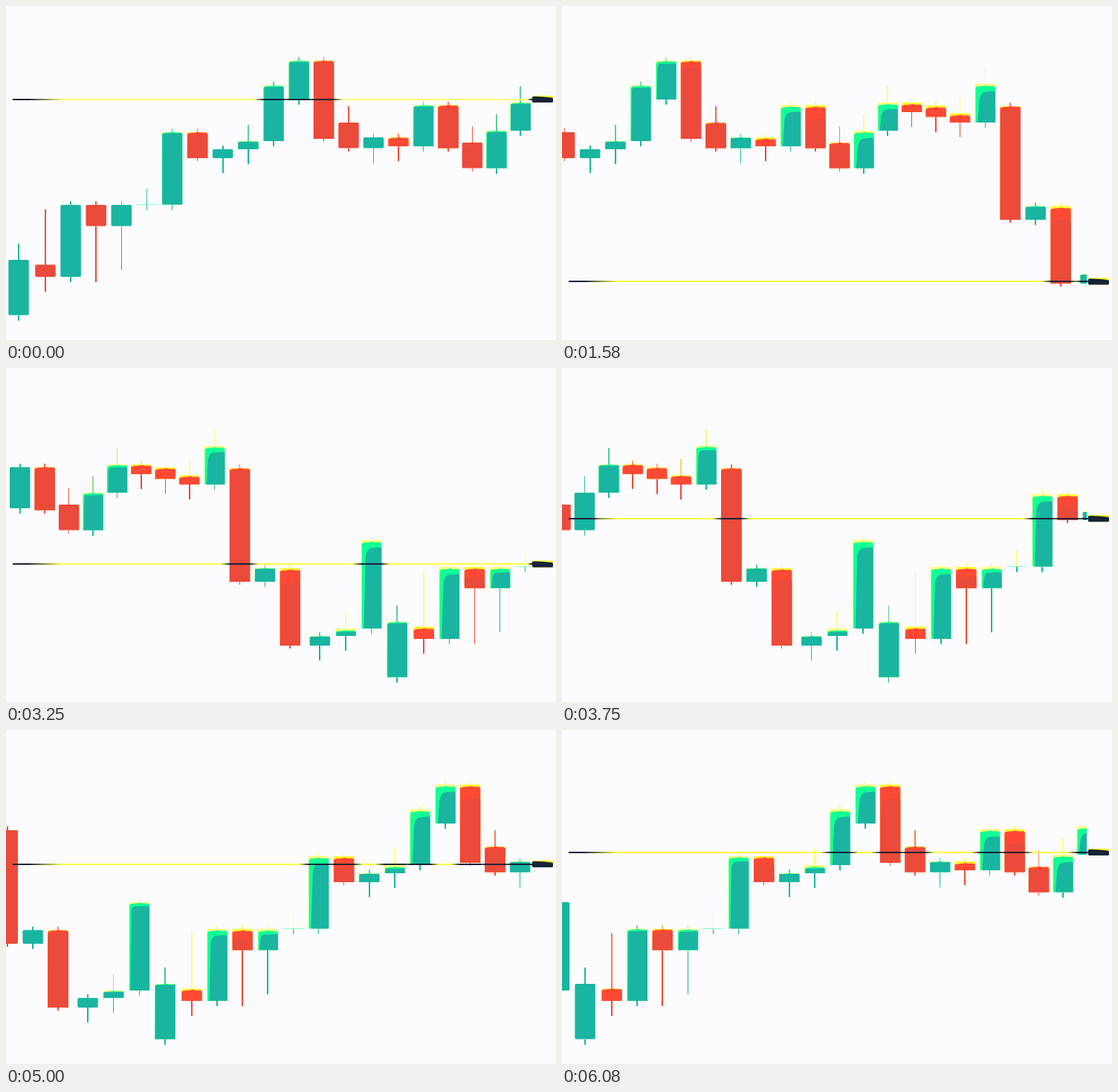
A matplotlib script that plays this animation: 740x450 px, repeating every 6160 ms.

```python
import numpy as np
import matplotlib.pyplot as plt
from matplotlib.animation import FuncAnimation
from matplotlib.collections import PolyCollection
from matplotlib.colors import to_rgb
from matplotlib.patches import Polygon, Rectangle

W, H = 740, 450
TICK_MS, LOOP_MS, RATE = 20, 6160, 12   # picture steps 12 times a second
PERIOD = 1052          # width of the repeating series
EDGE = 706             # candles are cut off here
HALF = 13.75           # half a body width

PAPER, NAVY, YELLOW = "#fcfcfe", "#172338", "#ffff2e"
TEAL, MINT = "#19b5a1", "#12ff96"
RED, SCARLET = "#ec4a3a", "#ff4934"

# Each candle opens at the last close unless it reopens at a gap.
CLOSES = [342, 365, 268, 296.5, 268, 267.5, 170, 205, 193, 182, 107, 73.5,
          179, 191.5, 177, 189, 133.5, 191.5, 218.5, 168, 130, 143, 149.5,
          157, 105, 288, 269.5, 374, 361, 351, 232]
REOPEN = {0: 416.5, 1: 348.5, 11: 126, 13: 157, 18: 184, 22: 134, 23: 144.5,
          25: 135}
LONG_TOP = {0, 5, 9, 13, 18, 19, 20, 23, 24, 29}
SPIKE_UP, SPIKE_DOWN = {1: 75}, {3: 75, 4: 59}

XS = np.interp(range(len(CLOSES)), [0, 1, 11, 17, 23, 27, 28, 31],
               [17, 53, 394, 595, 789.5, 925, 965, 1069])


def make_candles():
    """Open, close, high, low and glow strength of every candle."""
    out, prev_top = [], 232
    for i, close in enumerate(CLOSES):
        start = REOPEN.get(i, CLOSES[i - 1])
        top, bot = min(start, close), max(start, close)
        above = SPIKE_UP.get(i, 22 if i in LONG_TOP else 5)
        usual = 20 if 4 < bot - top < 17 else 7 if close < start else 4
        below = SPIKE_DOWN.get(i, usual)
        # a candle well below its neighbour hardly glows
        strength = 0.2 if top > prev_top + 15 else 1
        out.append((start, close, top - above, bot + below, strength))
        prev_top = top
    return out


CANDLES = make_candles()


def scroll_at(step):
    return np.interp(step, [0, 19, 51, 60, 74], [0, 254, 716, 855, PERIOD])


def price_path():
    """Price against scroll: open to close per candle, plus a few ticks."""
    ticks = [(0, 125.5), (254, 371), (427, 331.5), (543, 264), (716, 128.5),
             (855, 180.5), (1038, 164.5), (PERIOD, 125.5)]
    knots = list(ticks)
    for x, (start, close, *_) in zip(XS, CANDLES):
        for s, y in (((x - 720) % PERIOD, start), ((x - 690) % PERIOD, close)):
            if all(abs(s - t) > 4 for t, _ in ticks):
                knots.append((s, y))
    return np.array(sorted(knots)).T


PATH_S, PATH_Y = price_path()


def mix(a, b, t):
    return tuple(np.array(to_rgb(a)) * (1 - t) + np.array(to_rgb(b)) * t)


PALE = mix(YELLOW, PAPER, 0.35)


def box(x0, y0, x1, y1):
    return [(x0, y0), (x1, y0), (x1, y1), (x0, y1)]


def rounded(x0, y0, x1, y1):
    c = min(1.2, (y1 - y0) / 3)
    return [(x0 + c, y0), (x1 - c, y0), (x1, y0 + c), (x1, y1 - c),
            (x1 - c, y1), (x0 + c, y1), (x0, y1 - c), (x0, y0 + c)]


def curved(x0, x1, top, bot, rim, drop):
    """Inner face whose upper left corner is swept away."""
    knee = min(top + 2.2 * drop, bot - 0.5)
    return [(x0 + 0.6 * rim, bot), (x0 + rim, knee),
            (x0 + 1.4 * rim, top + 1.4 * drop), (x0 + 2 * rim, top + drop),
            (x1 - 4, top + 0.85 * drop), (x1, top + 0.95 * drop), (x1, bot)]


def candle(x, start, close, high, low, glow):
    """Polygons and colours of one candle; glow is the bright top left rim."""
    up = close < start
    top, bot = min(start, close), max(start, close)
    h = bot - top
    dull, vivid = (TEAL, MINT) if up else (RED, SCARLET)
    x0, x1 = x - HALF, x + HALF
    wick = mix(dull, PALE, min(1, 1.6 * glow))
    parts = [(box(x - 0.8, high, x + 0.8, top), wick),
             (box(x - 0.8, bot, x + 0.8, low), dull)]

    if h < 5 or glow < 0.1:
        parts.append((rounded(x0, top, x1, bot), vivid if h < 5 else dull))
        return parts

    parts.append((rounded(x0, top, x1, bot), PALE if up else YELLOW))
    side = 0.8 * glow if up else 0
    face = top + min(2.8 * glow, h / 3)
    wave = [(x0 + side, bot), (x0 + side, face + 2), (x0 + 3, face + 0.6),
            (x - 3, face), (x + 1, face - 0.8), (x + 5, face + 0.2),
            (x1 - 2, face), (x1, face + 1.5), (x1, bot)]
    parts.append((wave, vivid))

    size = glow * min(1, h / 45)
    if up:
        parts.append((curved(x0, x1, face, bot, 6 * size, 8 * size), dull))
    elif h > 28:
        parts.append((curved(x0, x1, face, bot, 1.5 * size, 18 * size), dull))
    return parts


fig = plt.figure(figsize=(W / 100, H / 100), dpi=100, facecolor=PAPER)
ax = fig.add_axes([0, 0, 1, 1])
ax.axis("off")

bars = PolyCollection([], linewidths=0, zorder=2)
ax.add_collection(bars)
bars.set_clip_path(Rectangle((0, 0), EDGE, H, transform=ax.transData))

line_x = np.arange(9, 736) + 0.5
line = ax.imshow(np.zeros((1, line_x.size, 4)), extent=(9, 736, 1, 0),
                 aspect="auto", interpolation="nearest", zorder=3)
tag_back = ax.add_patch(Polygon(box(0, 0, 1, 1), fc=YELLOW, lw=0, zorder=4))
tag = ax.add_patch(Polygon(box(0, 0, 1, 1), fc=NAVY, lw=0, zorder=5))
ax.set_xlim(0, W)
ax.set_ylim(H, 0)


def paint_line(y, bodies, fresh):
    """Yellow line, dark at its left end, over bodies and near the tag."""
    dark = np.clip((75 - line_x) / 45, 0, 1)
    dark = np.maximum(dark, np.clip((line_x - 702) / 4, 0, 1))
    for x, top, bot in bodies:
        if top - 2 < y < bot + 2:
            near = np.clip((HALF + 12 - np.abs(line_x - x)) / 12, 0, 1)
            dark = np.maximum(dark, near)
    base = np.array(mix(YELLOW, PAPER, 0.1 + 0.3 * (1 - fresh)))
    rgb = base + dark[:, None] * (np.array(to_rgb(NAVY)) - base)
    line.set_data(rgb[None])
    row = np.floor(y - 0.5)
    line.set_extent((9, 736, row + 2, row))


def draw(i):
    step = int((i * TICK_MS + 12) * RATE / 1000)
    scroll = scroll_at(step)
    y = np.interp(scroll, PATH_S, PATH_Y)
    fresh = min(1, 0.2 + step / 10)

    parts, bodies = [], []
    for x, (start, close, high, low, strength) in zip(XS, CANDLES):
        px = (x - scroll + 20) % PERIOD - 20
        if px < EDGE + HALF:
            glow = fresh * strength * np.clip((px - 10) / 320, 0, 1)
            parts += candle(px, start, close, high, low, glow)
            bodies.append((px, min(start, close), max(start, close)))
    bars.set_verts([p for p, _ in parts])
    bars.set_facecolor([c for _, c in parts])

    paint_line(y, bodies, fresh)
    top, bot = y - 4.7, y + 4.5
    tag_back.set_xy(rounded(708, top, 736, bot))
    tag.set_xy([(708, top + 1.6), (711, top + 1), (724, top + 1.6),
                (735, top + 2.8), (736, top + 4), (736, bot - 1),
                (735, bot), (709, bot), (708, bot - 1)])
    return bars, line, tag_back, tag


anim = FuncAnimation(fig, draw, frames=LOOP_MS // TICK_MS, interval=TICK_MS,
                     init_func=lambda: draw(0), repeat=True, repeat_delay=0,
                     blit=False)
plt.show()
```
